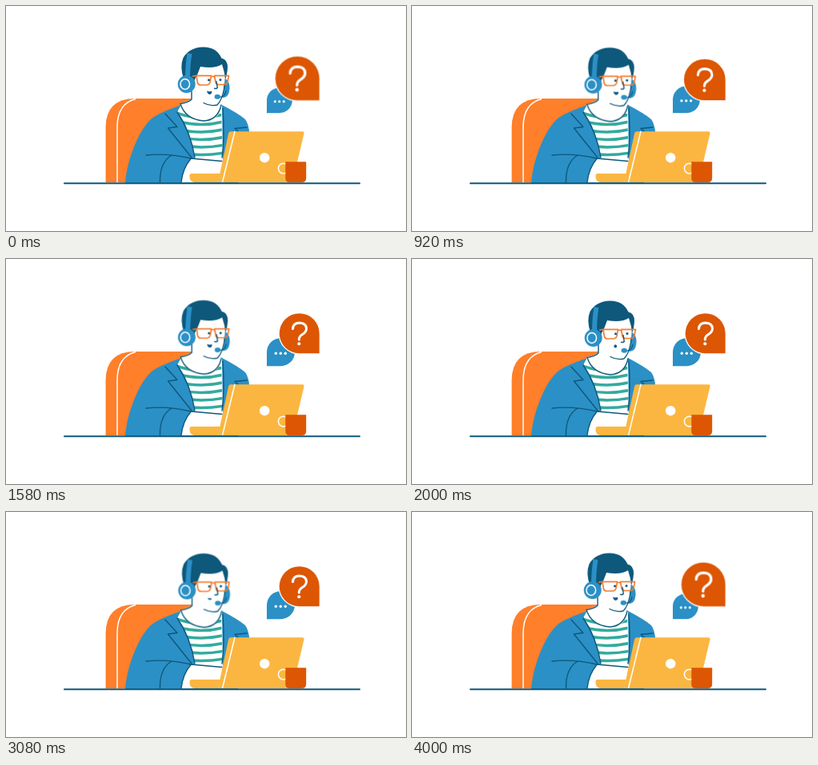
Recreate the animation shown at these times as an HTML page. Size 500 by 282 pixels, loop 4080 ms.

```html
<!DOCTYPE html>
<html lang="en">
<head>
<meta charset="utf-8">
<title>Support desk</title>
<style>
html, body { margin: 0; width: 100%; height: 100%; overflow: hidden; background: #fff; }
svg { display: block; width: 500px; height: 282px; }
.ink { fill: none; stroke: #0d587b; stroke-width: 1.4; stroke-linecap: round; stroke-linejoin: round; }
.white { fill: #fff; }
.hair { fill: #0d587b; }
.blue { fill: #2b90c6; }
.amber { fill: #fbb641; }
.rust { fill: #dc5603; }

.head { animation: nod .68s ease-in-out infinite alternate; }
@keyframes nod { to { transform: translate(1px, .9px); } }

.ask { transform-origin: 391.7px 118.2px; --rest: 1; --alt: 1.1; }
.chat { transform-origin: 326px 134.2px; --rest: 1; --alt: .91; }
.ask, .chat { animation: swell 4.08s ease-in-out infinite; }
@keyframes swell {
  0%, 8%, 100% { transform: scale(var(--alt)); }
  32.6%, 73.5% { transform: scale(var(--rest)); }
}

.mouth { animation: talk 4.08s step-end infinite; }
@keyframes talk {
  0%, 18.2%, 36.8%, 88.2% { d: path("M251 106.5Q254 107.8 257.4 106.8Q257.3 110.6 254.6 110.8Q251.8 110.4 251 106.5Z"); }
  8.2%, 26.5%, 53.2%, 83.3% { d: path("M250.4 107.6Q253.6 109 257.2 107.8Q254.4 110.8 250.4 107.6Z"); }
  12.2%, 42.9% { d: path("M251.4 108.2Q251.8 106.2 253.5 106.2Q255.4 106.8 255.2 108.8Q254.4 110.6 253 110.4Q251.4 109.8 251.4 108.2Z"); }
  69.3% { d: path("M251.3 107.2Q254 108 256.8 107.4Q256.4 109.8 254.3 109.8Q252 109.5 251.3 107.2Z"); }
}
</style>
</head>
<body>
<svg viewBox="0 0 500 282">
  <defs>
    <clipPath id="shirt"><path d="M214 132L218 123Q227 144 247 145.500Q262 145 269 130L271 193H235Z"/></clipPath>
  </defs>

  <g class="chair">
    <path fill="#ff7f2a" d="M124.600 221V152Q125 116 161 116H240V221Z"/>
    <path d="M139 221V151Q139.500 122 162 116.500" fill="none" stroke="#fff" stroke-width="1.500"/>
  </g>

  <g class="torso">
    <path class="blue" d="M149 222C150 200 163 159 181 142Q190 134 218 124.500L270 124Q291 135 299 142Q303 147 304.500 160L290 222Z"/>
    <path class="white" d="M214 132L220 122H270L271 196H236Z"/>
    <path clip-path="url(#shirt)" fill="none" stroke="#32ab9e" stroke-width="3.600"
      d="M210 133Q244 146 278 134M210 143Q244 154 278 143M210 153Q244 163 278 153M210 163Q244 172 278 163M210 173Q244 181 278 173M210 183Q244 190 278 183"/>
    <path class="blue" d="M218 125L197 134L212 151L203 153L234 192L236 190Q229 150 214 133Z"/>
    <path class="ink" d="M199 135L214 151.500L202.500 153L232 190M214 133Q231 158 236 190M271 128Q273.500 165 270 190M290 157L286 153.500L301 152"/>
  </g>

  <g class="head">
    <path class="blue" d="M270 90Q280 91 279.500 104Q278.500 116 270 115Z"/>
    <path class="white" d="M231 84L232 116Q227 120 218 122Q223 142 247 144Q265 142 268 124L268 120Q273 112 273 98L275 72Q256 60 235 72Z"/>
    <path class="ink" d="M232 107V117Q228 121 218 122.500Q224 142 247 144Q265 143 269 124M247 121.500Q255 126 264 124Q270 118 272.500 104L273 98"/>
    <path class="hair" d="M222 91Q217 76 221.500 65Q229 52 246 51.500Q263 51 269.500 65.500Q277 67 277 77Q276.500 86 274 92Q273.500 83 270 73Q261 79 243 76Q240 85 236 92L232 104L226 101Z"/>
    <path d="M229.500 59.500Q227 74 227 93" fill="none" stroke="#2b90c6" stroke-width="6"/>
    <circle class="blue" cx="225.700" cy="98" r="11"/>
    <ellipse cx="223.800" cy="98" rx="5.800" ry="6.500" fill="none" stroke="#fff" stroke-width="1.500"/>
    <path d="M275 106Q274 114 266 114.500" fill="none" stroke="#0d587b" stroke-width="1.200"/>
    <ellipse class="blue" cx="264.300" cy="113.800" rx="3.700" ry="3"/>
    <path d="M233 88L238 87.300H256.500L255 95.500Q254 99 250.500 99H243.500Q240 99 239.400 96L238 87.300M260.500 87.300H278.500L277 95Q276 98.500 273 98.500H265.500Q262.500 98.500 262 95.500ZM256 89Q258 87.500 260.500 89"
      fill="none" stroke="#f47b30" stroke-width="1.700" stroke-linejoin="round"/>
    <circle class="hair" cx="253.500" cy="92.800" r="1.500"/>
    <circle class="hair" cx="268" cy="92.600" r="1.500"/>
    <path class="ink" d="M263 94.500L264.300 102.500Q263 104 260.500 103.300"/>
    <path class="hair mouth" d="M251 106.500Q254 107.800 257.400 106.800Q257.300 110.600 254.600 110.800Q251.800 110.400 251 106.500Z"/>
  </g>

  <g class="arm">
    <path class="blue" d="M175 187Q202 184 231 191L219 222H160Z"/>
    <path class="white" d="M219 221Q222 201 231 191.500L271 194.500L267 221Z"/>
    <path class="ink" d="M175 187Q202 184 231 191L270 194.500M207 187Q192 196 192.500 221M231 191.500Q221 203 219 221"/>
  </g>

  <g class="desk">
    <path class="amber" d="M232 210H268L265 221H235Q229 220 229.500 212Q230 210 232 210Z"/>
    <path class="amber" d="M280.500 157.300H370.500Q373 157.300 372.500 160L358 221H265L278 160Q278.500 157.300 280.500 157.300Z"/>
    <path d="M286 157L270.500 221" stroke="#fff" stroke-width="1.500"/>
    <circle class="white" cx="323.200" cy="190.200" r="6.200"/>
    <circle cx="346.800" cy="203.600" r="6.400" fill="none" stroke="#fff" stroke-width="1.500"/>
    <path class="rust" d="M349.300 195.300H375.200V216Q375 221 370 221H354.500Q349.300 221 349.300 216Z"/>
    <path d="M73 222.200H442" stroke="#0d587b" stroke-width="2" stroke-linecap="round"/>
  </g>

  <g class="chat">
    <path class="blue" d="M326 134.200V116.700A17.500 17.500 0 1 1 343.500 134.200Z"/>
    <g class="white">
      <circle cx="337.300" cy="118.300" r="1.700"/>
      <circle cx="343.300" cy="118.300" r="1.700"/>
      <circle cx="349.300" cy="118.300" r="1.700"/>
    </g>
  </g>

  <g class="ask">
    <path d="M391.700 118.200H366.700A25 25 0 1 1 391.700 93.200Z" fill="none" stroke="#fff" stroke-width="2.400"/>
    <path class="rust" d="M391.700 118.200H366.700A25 25 0 1 1 391.700 93.200Z"/>
    <path d="M358.500 87.500Q359 80 367 80Q375.500 80.300 375.500 87.500Q375.300 91.500 370.500 94.500Q366.300 97 366.300 101" fill="none" stroke="#fff" stroke-width="3" stroke-linecap="round"/>
    <circle class="white" cx="366.300" cy="106.200" r="2"/>
  </g>
</svg>
</body>
</html>
```
